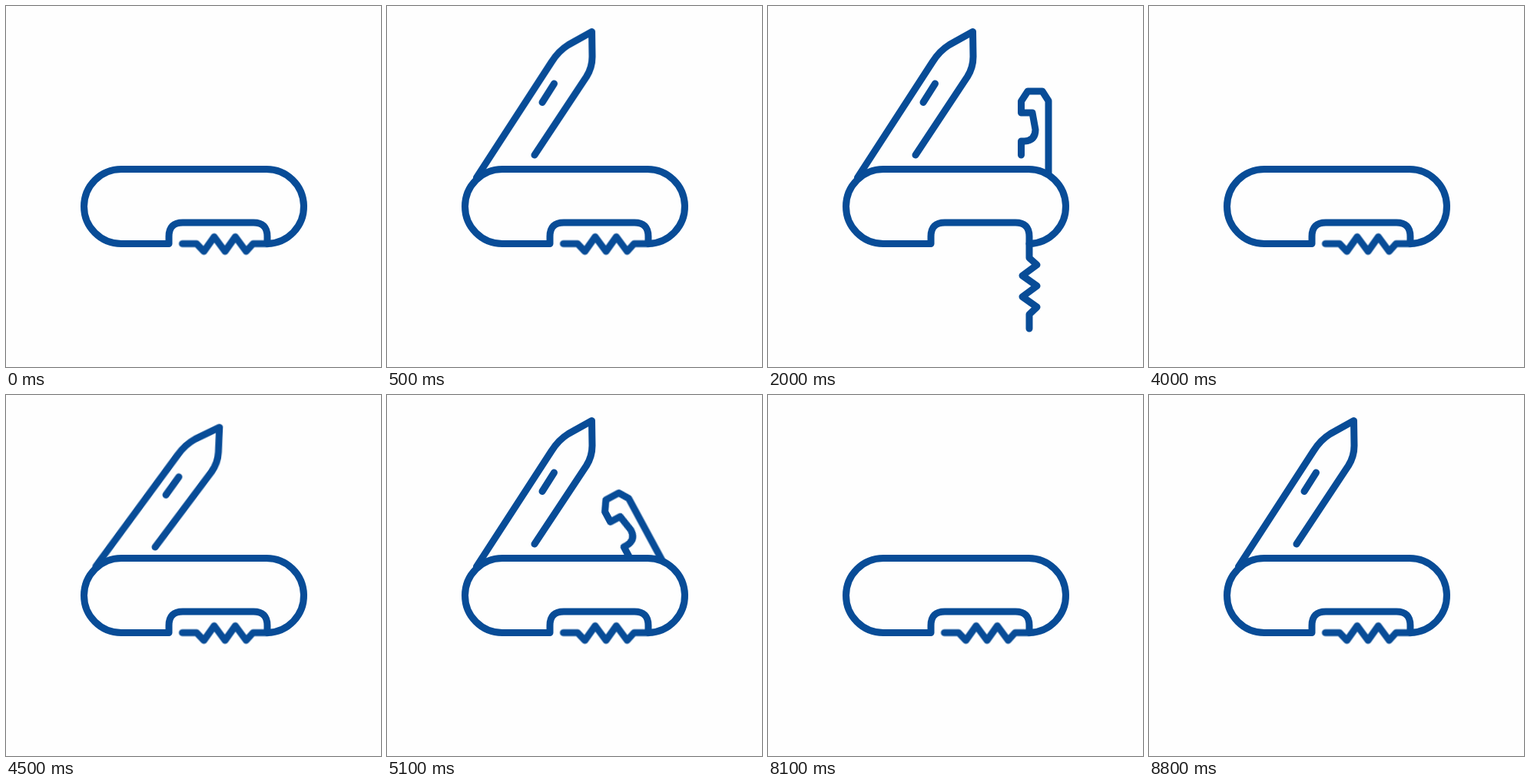
An HTML page without scripts for the animation above (8900 ms loop, 488 by 470 pixels).

```html
<!DOCTYPE html>
<html lang="en">
<head>
<meta charset="utf-8">
<title>Pocket knife</title>
<style>
  html, body { margin: 0; width: 100%; height: 100%; overflow: hidden; background: #fefefe; }
  svg { display: block; width: 488px; height: 470px; }
  path {
    fill: none; stroke: #084c97; stroke-width: 9;
    stroke-linecap: round; stroke-linejoin: round;
  }
  .body { fill: #fefefe; }

  /* Each part snaps shut, then swings out past its rest angle and settles. */
  .part {
    --back: cubic-bezier(.34, 1.56, .64, 1);
    animation: 8.9s step-end infinite;
  }
  .blade { --shut: rotate(57deg); transform-origin: 125px 232px; animation-name: blade; }
  .opener { --shut: rotate(-90deg); transform-origin: 362px 229px; animation-name: opener; }
  .screw { --shut: rotate(90deg); transform-origin: 340px 309.5px; animation-name: screw; }

  @keyframes blade {
    0%, 44.5%, 90.8% { transform: var(--shut); }
    .17%, 46.63%, 93.15% { transform: var(--shut); animation-timing-function: var(--back); }
    5.79%, 52.25%, 98.76%, 100% { transform: rotate(0deg); }
  }
  @keyframes opener {
    0%, 44.5%, 90.8%, 100% { transform: var(--shut); }
    8.6%, 55.06% { transform: var(--shut); animation-timing-function: var(--back); }
    14.21%, 60.67% { transform: rotate(0deg); }
  }
  @keyframes screw {
    0%, 44.5%, 90.8%, 100% { transform: var(--shut); }
    16.8%, 63.56% { transform: var(--shut); animation-timing-function: var(--back); }
    22.36%, 69.18% { transform: rotate(0deg); }
  }
</style>
</head>
<body>
<svg viewBox="0 0 488 470">
  <g class="part blade">
    <path d="M116.5 223.4L214 73Q223 58.5 236 50.5L266.5 33.5L267 66Q267 80 259.5 92L192 194"/>
    <path d="M217.5 101L202 125.5"/>
  </g>
  <path class="part opener" d="M329.5 194V176H334Q348 175 348 161L344 139H329.5V124L338 111H357L365 123.5V225"/>
  <path class="body" d="M212 309.5H150A48.5 48.5 0 0 1 150 212.5H338A48.5 48.5 0 0 1 340 309.5V300Q340 282 322 282H230Q212 282 212 300Z"/>
  <path class="part screw" d="M340 309.5V328L350 337L331 351L350 364.5L331 378.5L350 392L340 401.5V420"/>
</svg>
</body>
</html>
```
